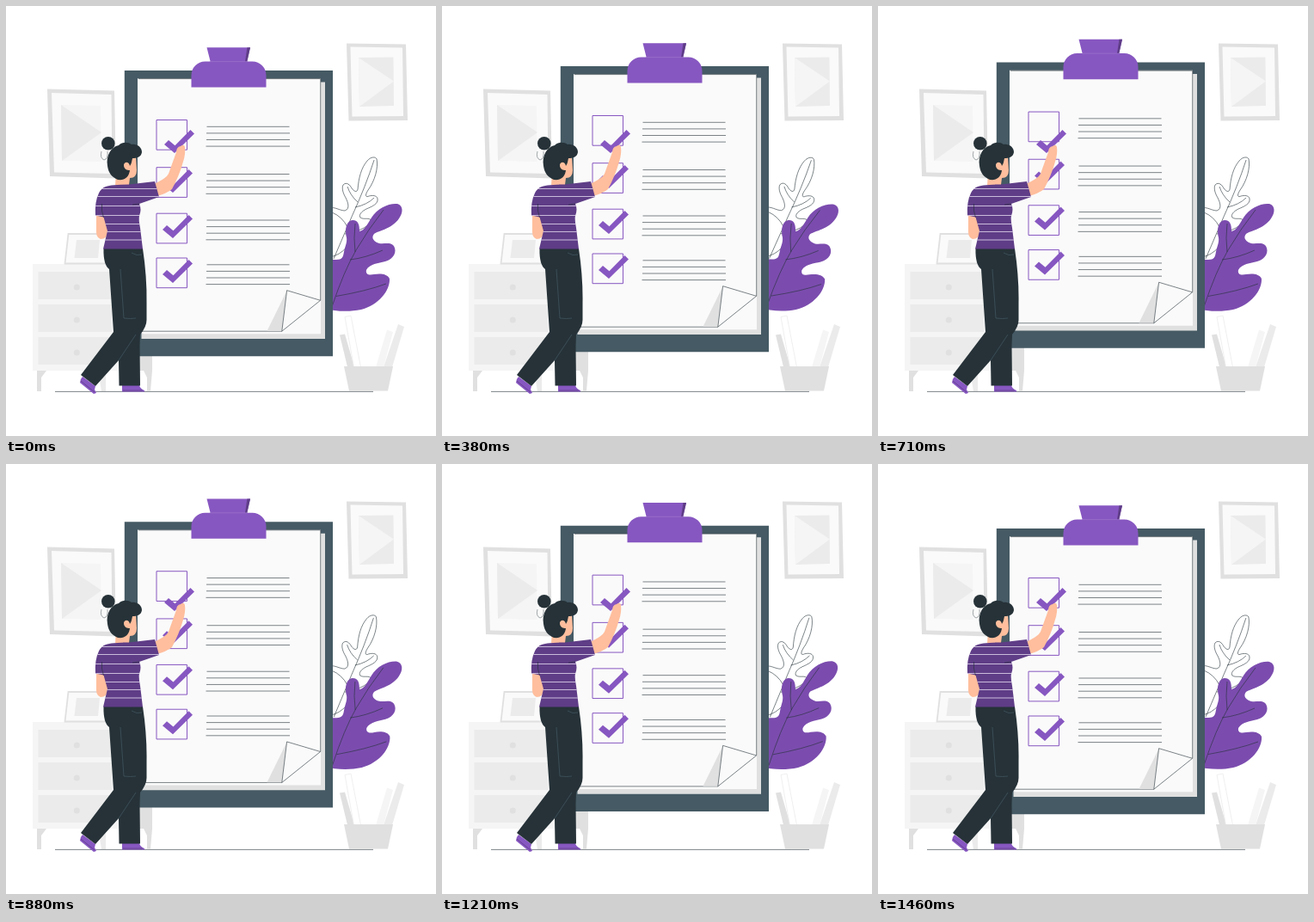
An HTML page for the animation above (1500 ms loop, 500 by 500 pixels).

```html
<!DOCTYPE html>
<html lang="en">
<head>
<meta charset="utf-8">
<title>Checklist</title>
<style>
  html, body { margin: 0; height: 100%; overflow: hidden; background: #fff; }
  svg { display: block; width: 100vw; height: 100vh; }
  .ink { fill: none; stroke: #263238; stroke-width: .6; }
  .skin { fill: #ffbe9d; }
  .dark { fill: #263238; }
  .violet { fill: #8757c1; }
  .g1 { fill: #fafafa; }
  .g2 { fill: #f5f5f5; }
  .g3 { fill: #ebebeb; }
  .g4 { fill: #e0e0e0; }
</style>
</head>
<body>
<svg viewBox="0 0 500 500">
  <defs>
    <g id="item">
      <path d="M175 132.500h35.500v34.700H175z" fill="none" stroke="#8757c1"/>
      <path class="ink" d="M233.500 140.300h96M233 147.900h97M233 155.500h97M232.500 163.100h97.500"/>
    </g>
    <path id="check" class="violet" d="M182 260l5-5 7.500 6.200L212.500 243l4.500 4.500L194 270z"/>
    <g id="drawer">
      <path class="g3" d="M37.500 309H123v32H37.500z"/>
      <circle class="g4" cx="82.300" cy="327" r="3.500"/>
    </g>
    <clipPath id="shirtShape">
      <path id="shirt" d="M116 210Q122 207.500 143 207.500L173 204l5 18-23 8q3 6 0 14-1 4 1 14l3 24.500h-46l5-21-4.500-16-9.500-2q-1-16 4-26 3-6 8-7.500z"/>
    </clipPath>
  </defs>

  <!-- wall pictures -->
  <path class="g4" d="M48 96.500l78 2 2 102-77-2.500z"/>
  <path class="g1" d="M53 101l69.500 2 1 92L56 193.500z"/>
  <path class="g2" d="M64 115l46 1 .5 65-45.500-1z"/>
  <path class="g3" d="M64 115l47 32-46 33z"/>
  <path class="g4" d="M396 43.500l69 1 2 88.500-68.500.5z"/>
  <path class="g1" d="M400.500 47.500l60.500 1 1 79.500-59.500.5z"/>
  <path class="g3" d="M410 60l40.500-.5.5 56.500-40 1z"/>
  <path class="g2" d="M410 60l41 27.500-40 29.500z"/>

  <!-- cabinet -->
  <path class="g4" d="M36 424h11l-6 8v16h-5zM170 424h-10l4 8v15.500h4z"/>
  <path class="g3" d="M107 424h9v24h-5z"/>
  <path class="g2" d="M31 300h124v124H31z"/>
  <path class="g4" d="M155 300h15v124h-15z"/>
  <use href="#drawer"/>
  <use href="#drawer" y="38"/>
  <use href="#drawer" y="76"/>
  <path d="M72.500 265H120v34.500H68.500z" fill="#fafafa" stroke="#e0e0e0" stroke-width="1.800"/>
  <path class="g3" d="M82 272h27l-2 21H79.500z"/>

  <!-- pencil pot -->
  <path class="g4" d="M388 382.500l6-1 11 38h-8z"/>
  <path d="M394 361.500l7-1.500 11.500 60h-8z" fill="#fff" stroke="#ebebeb" stroke-width=".8"/>
  <path class="g2" d="M443 376.500l7 2.500-11 41h-9z"/>
  <path class="g3" d="M456 370l7 3-14 47h-10z"/>
  <path class="g4" d="M393 419h57l-6 28.500h-45z"/>

  <path class="ink" d="M57 448.400h370"/>

  <g id="plant">
    <path class="ink" style="fill:#fff" d="M376 235c6-2 12 3 18 3 6-2 4-9 1-15-3-5-5-11-3-15 4-4 8 0 10 4 3 4 6 5 7 1 1-13 4-25 11-33 4-5 10-5 11-2 2 10-2 25-10 36-4 6-3 9 1 7 4-1 9-1 10 3 1 6-6 9-13 12-6 3-9 7-7 10 4 3 11-1 13 4 0 5-7 9-15 15-9 8-17 25-34 27z"/>
    <path class="ink" d="M428 179Q418 210 402 245L381 294M409 228q-9-8-12-18M406 234q14-3 22-11M397 257q-6-12-18-17M394 265q17-2 28-11"/>
    <path fill="#7b4cae" d="M370 295h14c7 0 8-3 9-9 1-6 4-11 3-17-2-8-1-19 7-20 7 0 8 6 8 13 6-1 9-8 14-16 7-11 20-17 30-16 7 2 7 10 2 17-8 12-23 14-29 18-4 5 0 9 6 11 6 1 13-2 17 3 4 7 0 15-10 18-8 2-18 3-22 10-1 6 4 6 9 5 7-1 15-1 18 5 1 14-13 31-33 36-14 3-30 2-43-1z"/>
    <path class="ink" d="M379 350Q393 308 407 284t32-47M384 337.500q35-6 58-14.500M400 295q18-2 38-11M406 286q-2-16 0-33"/>
  </g>

  <g id="board">
    <path fill="#455a64" d="M137.800 75H380v332.300H137.800z"/>
    <path class="g4" d="M157.500 88.500h213.500v298.500H157.500z"/>
    <path class="g1" d="M153 84.300h213v297H160L153 378z"/>
    <path class="ink" d="M154 84.600h211.700v257.500M321 378.200H158"/>
    <path class="g4" d="M326.600 331l-23.100 47H321z"/>
    <path class="ink" style="fill:#fafafa" d="M326.600 330.700l39 11.600-44.800 35.900z"/>
    <path class="violet" d="M233.500 48.300H284L280 66h-42zM215.500 94.600V80.500a16 16 0 0 1 16-16h55a16 16 0 0 1 16 16v14.100z"/>
    <path fill="#5f3d87" d="M280.500 48.300h3.500L280.300 64.500H278z"/>
    <path d="M237 64.600h44" stroke="#9f79cd" stroke-width=".6"/>
    <use href="#item"/>
    <use href="#item" y="55.200"/>
    <use href="#item" y="108.700"/>
    <use href="#item" y="160.500"/>
    <use href="#check" y="-53"/>
    <use href="#check"/>
    <use href="#check" y="52"/>
  </g>

  <!-- the mark being drawn stays at the hand -->
  <use href="#check" x="2" y="-99"/>

  <!-- woman -->
  <path class="violet" d="M89 431l15 11-1 4 2 4-3 1-16-13q0-4 3-7zM135 441h20q1 4 6 6v1.500h-26z"/>
  <path d="M87 436l16 13M136 447h23" stroke="#5f3d87" stroke-width=".8"/>
  <path class="skin" d="M105 244h13v18q0 9-8 9-5-2-5-8z"/>
  <path class="skin" d="M172 207q15-7 17-12l9-25q0-6 5-7 4-3 5 1 1 8-2 17-4 15-13 32-6 5-18 8z"/>
  <path class="skin" d="M128 195l9-15 14-4 1 15q0 9-8 9l-1 8q-6 3-16 0z"/>
  <path class="dark" d="M118 186c-2-12 4-22 13-24 4-4 11-4 15-1 6-1 12 3 12 9-1 6-6 7-11 7-1 5-1 6-3 9-1-6-7-5-7-1 0 5 4 6 7 6-1 8-6 12-14 11-7-3-11-8-12-16z"/>
  <circle class="dark" cx="118.800" cy="159.800" r="7.800"/>
  <path class="ink" d="M111 169q-2 8 3 10 5-1 4-10" stroke-opacity=".7"/>
  <path class="dark" d="M113.500 282H159q5 33 4.500 63v20q0 8-7.500 17l-.5 13 .5 46.500h-24.500L131 412l-27 30-17-13 38-50-5-73q-7-5-6.500-24z"/>
  <path d="M133 306l4 57M137 363q8 1 14 0M131 412l20-30M146 287q6 4 12 2" fill="none" stroke="#455a64" stroke-width=".7"/>
  <use href="#shirt" fill="#5f3d87"/>
  <path clip-path="url(#shirtShape)" d="M100 212.500h80M100 221.500h80M100 232.500h80M100 243.500h60M100 253.500h60M100 262.500h60M100 272h60" stroke="#e6dcf1" stroke-width=".8"/>
  <path class="ink" d="M113.500 246q-3-8-2-16M155 230l-8 1"/>
</svg>
<script>
  const LOOP = 1500, FPS = 24, STEPS = LOOP * FPS / 1000;
  const board = document.getElementById("board");
  const plant = document.getElementById("plant");

  // Triangle wave: 0 at p = 0, 1 at p = .5, back to 0 at p = 1
  const triangle = p => 1 - Math.abs(1 - 2 * (p - Math.floor(p)));

  function draw(now) {
    const step = Math.floor(now % LOOP * FPS / 1000 + .1) % STEPS;
    const p = (step + .5) / STEPS;
    const lift = 10 * triangle(p);
    const sway = 2 * triangle(p + .25) - 1;
    board.setAttribute("transform", `translate(0 ${.28 - lift})`);
    plant.setAttribute("transform", `rotate(${sway} 410 266)`);
  }

  const start = performance.now();
  function tick() {
    draw(performance.now() - start);
    requestAnimationFrame(tick);
  }
  tick();
</script>
</body>
</html>
```
